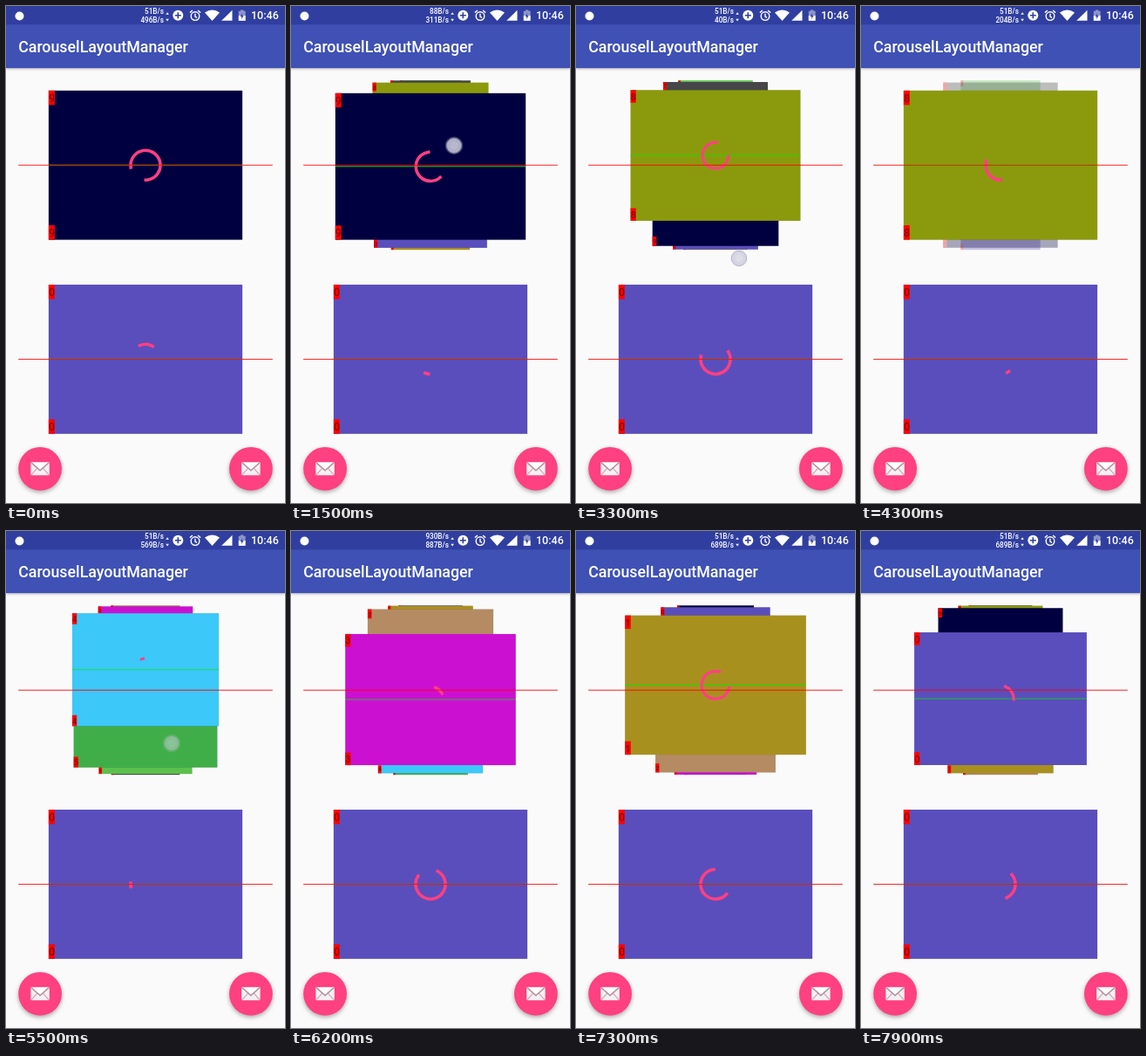
An HTML page that plays this animation: 320x569 px, repeating every 8 s.

```html
<!DOCTYPE html>
<html lang="en">
<head>
<meta charset="utf-8">
<title>Carousel</title>
<style>
  html, body { margin: 0; width: 100%; height: 100%; overflow: hidden; background: #fafafa; }
  svg { display: block; width: 100%; height: 100%; }
  text { font-family: Roboto, Arial, sans-serif; fill: #fff; }
  .title { font-size: 17.8px; font-weight: 500; }
  .clock { font-size: 12.5px; font-weight: 500; }
  .speed { font-size: 8.2px; font-weight: 500; text-anchor: end; }
  .label { font-size: 12.4px; fill: #000; fill-opacity: .56; }
  .ring { fill: none; stroke: #ff4081; stroke-width: 3.6; stroke-linecap: square; }
  .item { filter: drop-shadow(0 .6px .6px rgba(0, 0, 0, .28)); }
  .fab { filter: drop-shadow(0 2.5px 2.5px rgba(0, 0, 0, .32)); }
  .bar { filter: drop-shadow(0 1.5px 1.5px rgba(0, 0, 0, .28)); }
</style>
</head>
<body>
<svg viewBox="0 0 320 569" preserveAspectRatio="none">
  <defs>
    <g id="fab">
      <circle class="fab" r="24.9" fill="#ff4081"/>
      <rect x="-10.7" y="-7.5" width="21.4" height="15" rx="1" fill="#f3f1f2"/>
      <path d="M-10.2 7 L-3.2 -.6 M10.2 7 L3.2 -.6" stroke="#d3a3b3" stroke-width="1.2"/>
      <path d="M-10.2 -7 L0 2 L10.2 -7" stroke="#b9899b" stroke-width="1.5" fill="#fff"/>
    </g>
  </defs>

  <rect width="320" height="569" fill="#fafafa"/>
  <rect class="bar" width="320" height="71.1" fill="#3f51b5"/>
  <rect width="320" height="21.3" fill="#303f9f"/>
  <text class="title" x="14.2" y="53.1">CarouselLayoutManager</text>

  <g fill="#fff">
    <circle cx="15.5" cy="11.5" r="5"/>
    <text class="speed" id="up" x="181" y="9"></text>
    <text class="speed" id="down" x="181" y="19"></text>
    <path d="M183.3 9.8 l1.8 -2.6 1.8 2.6z M183.3 14.8 l1.8 2.6 1.8 -2.6z"/>
    <circle cx="197.3" cy="10.8" r="6"/>
    <path d="M197.3 7.3 v7 M193.8 10.8 h7" stroke="#303f9f" stroke-width="1.6"/>
    <g fill="none" stroke="#fff" stroke-width="1.4">
      <circle cx="217" cy="11.6" r="4.8"/>
      <path d="M217 8.8 v3.2 l2 1.3 M210.9 7.6 l3 -2.6 M223.1 7.6 l-3 -2.6"/>
    </g>
    <path d="M228 7.4 Q236.5 1.6 245 7.4 L236.5 17z"/>
    <path d="M259.5 4.8 V16.8 H247.2z"/>
    <path d="M269 4.5 h3.4 v1.3 h2.2 v11 h-7.8 v-11 h2.2z" fill-opacity=".45"/>
    <path d="M266.8 11 h7.8 v5.8 h-7.8z"/>
    <path d="M271.2 8 l-2.6 4.2 h1.8 l-.4 3 2.6 -4.2 h-1.8z" fill="#303f9f"/>
  </g>
  <text class="clock" x="281" y="15.3">10:46</text>

  <g id="upper"></g>
  <g id="lower"></g>
  <path d="M14.2 182.2 H305.8 M14.2 404.4 H305.8" stroke="#f00" stroke-width=".89"/>

  <g id="touch">
    <circle r="10.3" fill="#dcdcec" fill-opacity=".3"/>
    <circle r="8.6" fill="#cfcfdf" stroke="#9c9cb4" stroke-width=".8"/>
    <circle r="4.5" fill="#e4e4ee" fill-opacity=".5"/>
  </g>
  <use href="#fab" x="39.1" y="529.8"/>
  <use href="#fab" x="280.9" y="529.8"/>
</svg>

<script>
const LOOP = 8000, STEP = 100, FIRST = 9;
const WIDTH = 222.2, HEIGHT = 170.7, REACH = 11.55, VISIBLE = 2;
const UPPER_Y = 182.2, LOWER_Y = 404.4;
const COLORS = ['#5a4ebd', '#a8901f', '#b58b63', '#cc10d2', '#3cc8f8',
                '#3fae49', '#5cc04c', '#464649', '#8b9a0c', '#000040'];

const DRAG = 1200, SETTLED = 4200, FLING = 5500;
const GLIDE = [[FLING, 4.48], [6200, 2.79], [7300, 1.11], [7900, -.19]];
// upload/download reading for each second
const SPEEDS = '51/496 88/311 51/40 51/40 51/204 51/569 930/887 51/689'.split(' ');

const $ = id => document.getElementById(id);
const clamp = x => Math.min(1, Math.max(0, x));
const smooth = x => x * x * (3 - 2 * x);

// cubic-bezier(.4, 0, .2, 1)
function ease(x) {
  let lo = 0, hi = 1;
  for (let i = 0; i < 20; i++) {
    const s = (lo + hi) / 2, r = 1 - s;
    if (1.2 * s * r * r + .6 * s * s * r + s ** 3 < x) lo = s; else hi = s;
  }
  return smooth(lo);
}

function glide(t) {
  const i = Math.max(1, GLIDE.findIndex(([time]) => time >= t));
  const [t0, a] = GLIDE[i - 1], [t1, b] = GLIDE[i];
  return a + (b - a) * (t - t0) / (t1 - t0);
}

function position(t) {
  return t < FLING ? FIRST - smooth(clamp((t - DRAG) / (SETTLED - DRAG))) : glide(t);
}

// neighbours appear with motion and fade once the list rests
function neighbourOpacity(t) {
  if (t >= FLING) return 1;
  return t < DRAG ? 0 : clamp(1 - (t - SETTLED) / 150);
}

// the first card spins from the start, the others begin as they come into view
function phase(i) {
  return i === FIRST ? 1.5 : 4.82 + .1 * i + .036 * i * i;
}

function makeCard(parent, index) {
  const g = document.createElementNS('http://www.w3.org/2000/svg', 'g');
  const left = -WIDTH / 2, top = -HEIGHT / 2, labelHeight = 16.5;
  const label = y => `<rect x="${left}" y="${y}" width="7" height="${labelHeight}" fill="#f00"/>
    <text class="label" x="${left}" y="${y + 13.1}">${index}</text>`;
  g.setAttribute('class', 'item');
  g.innerHTML = `<rect x="${left}" y="${top}" width="${WIDTH}" height="${HEIGHT}" fill="${COLORS[index]}"/>
    ${label(top)}${label(-top - labelHeight)}
    <path d="M${left} 0 h${WIDTH}" stroke="#00e800" stroke-width=".89"/>
    <circle class="ring" r="17" pathLength="360"/>`;
  parent.append(g);
  return { g, ring: g.querySelector('.ring'), index };
}

function spin(ring, phase, t) {
  const turns = t / 1333 + phase, p = turns % 1;
  const start = .75 * ease(clamp(2 * p - 1)), end = .75 * ease(clamp(2 * p));
  const angle = 360 * (start + p / 4) + 144 * turns - 90;
  ring.setAttribute('transform', `rotate(${angle})`);
  ring.setAttribute('stroke-dasharray', `${(end - start) * 360 + 8} 400`);
}

function place(card, d) {
  const dist = Math.abs(d);
  const scale = 2 - 4 * Math.atan(dist + 1) / Math.PI;
  const far = dist > Math.cbrt(1 / VISIBLE);
  const shift = REACH * (far ? Math.cbrt(clamp(dist / VISIBLE)) : dist * dist);
  const y = UPPER_Y + Math.sign(d) * (shift + HEIGHT * (1 - scale) / 2);
  card.g.setAttribute('transform', `translate(160 ${y}) scale(${scale})`);
}

const cards = COLORS.map((_, i) => makeCard($('upper'), i));
const single = makeCard($('lower'), 0);
single.g.setAttribute('transform', `translate(160 ${LOWER_Y})`);

function drawTouch(t, pos) {
  const dragging = t >= DRAG && t < SETTLED - 600;
  const pressing = t >= FLING - 200 && t <= FLING;
  const x = t < SETTLED ? 187 : 190;
  const y = t < SETTLED ? 155 + (FIRST - pos) * HEIGHT : 243 - .6 * (FLING - t);
  $('touch').setAttribute('transform', `translate(${x} ${y})`);
  $('touch').style.opacity = t === FLING ? .5 : dragging || pressing ? .85 : 0;
}

function draw(t) {
  const pos = position(t), fade = neighbourOpacity(t), count = cards.length;
  for (const card of cards) {
    const d = (card.index - pos + 1.5 * count) % count - count / 2;
    card.dist = Math.abs(d);
    place(card, d);
    spin(card.ring, phase(card.index), t);
    card.g.style.opacity = card.dist <= .5 ? 1 : card.dist < 3 ? fade : 0;
  }
  [...cards].sort((a, b) => b.dist - a.dist).forEach(card => $('upper').append(card.g));
  spin(single.ring, 2.78, t);
  drawTouch(t, pos);

  const [up, down] = SPEEDS[Math.floor(t / 1000)].split('/');
  $('up').textContent = up + 'B/s';
  $('down').textContent = down + 'B/s';
}

// the screen refreshes ten times a second
function tick() {
  draw(Math.floor(performance.now() % LOOP / STEP) * STEP);
  requestAnimationFrame(tick);
}
tick();
</script>
</body>
</html>
```
